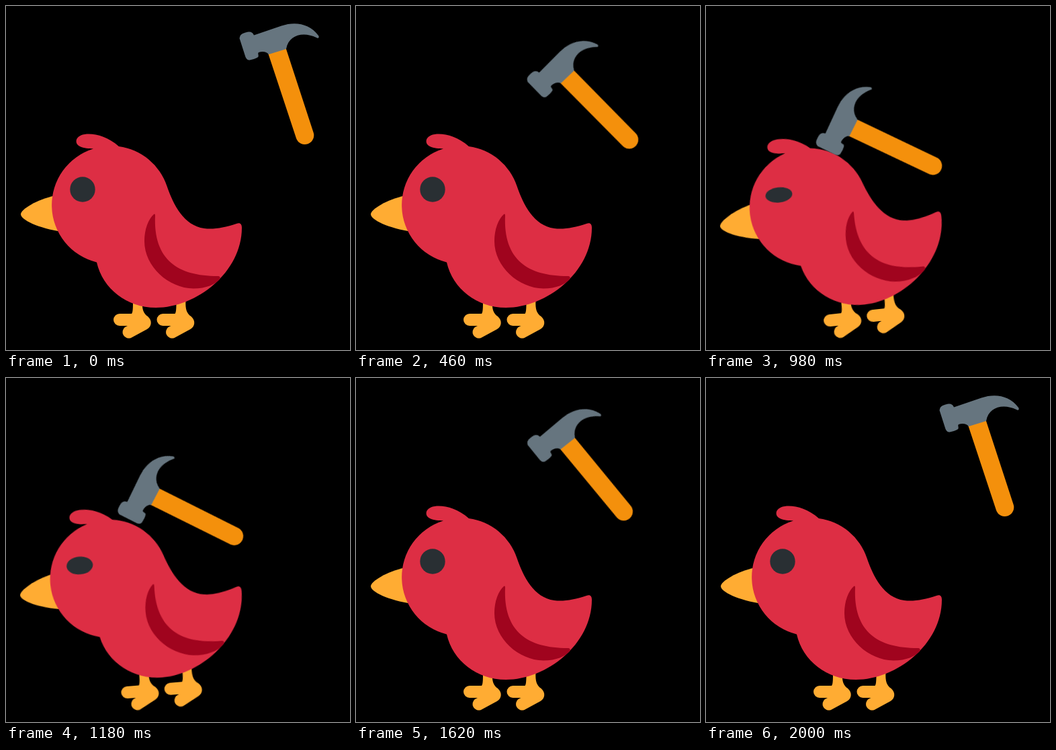
Write an HTML page without scripts that moves like this. It is 512 by 512 pixels and loops after 2080 ms.

```html
<!DOCTYPE html>
<html lang="en">
<head>
<meta charset="utf-8">
<title>Bird and hammer</title>
<style>
  html, body { margin: 0; width: 100%; height: 100%; overflow: hidden; background: #000; }
  svg { display: block; width: 100%; height: 100%; }

  .hammer, .bird, .eye { animation: 2080ms linear infinite; }
  .hammer { transform-origin: 413px 102px; animation-name: swing; }
  .bird { transform-origin: 186.5px 328px; animation-name: tilt; }
  .eye { transform-origin: 114px 273px; animation-name: squint; }

  /* each step lasts 20 ms */
  @keyframes swing {
    0% { transform: translate(0, 0) rotate(0deg); animation-timing-function: steps(12); }
    11.538% { transform: translate(-38px, 10px) rotate(-13.8deg); animation-timing-function: steps(11); }
    22.115% { transform: translate(-75px, 30px) rotate(-26.4deg); animation-timing-function: steps(4); }
    25.962% { transform: translate(-91px, 38.5px) rotate(-30.8deg); animation-timing-function: steps(11); }
    36.538% { transform: translate(-142px, 74px) rotate(-43.5deg); animation-timing-function: steps(4); }
    40.385% { transform: translate(-160px, 92px) rotate(-45.3deg); animation-timing-function: steps(8); }
    48.077% { transform: translate(-163px, 97px) rotate(-46.5deg); animation-timing-function: steps(9); }
    56.731% { transform: translate(-160px, 92.3px) rotate(-45.3deg); animation-timing-function: steps(13); }
    69.231% { transform: translate(-103.6px, 45px) rotate(-31.3deg); animation-timing-function: steps(9); }
    77.885% { transform: translate(-77px, 24px) rotate(-21.3deg); animation-timing-function: steps(8); }
    85.577% { transform: translate(-47.8px, 11.1px) rotate(-11.8deg); animation-timing-function: steps(11); }
    96.154%, 100% { transform: translate(0, 0) rotate(0deg); }
  }
  @keyframes tilt {
    0%, 39.423% { transform: rotate(0deg); animation-timing-function: steps(9); }
    48.077% { transform: rotate(-7deg); animation-timing-function: steps(9); }
    56.731% { transform: rotate(-4.7deg); animation-timing-function: steps(6); }
    62.5%, 100% { transform: rotate(0deg); }
  }
  @keyframes squint {
    0%, 39.423% { transform: scale(1, 1); animation-timing-function: steps(9); }
    48.077% { transform: scale(1.08, .56); animation-timing-function: steps(9); }
    56.731% { transform: scale(1.05, .71); animation-timing-function: steps(6); }
    62.5%, 100% { transform: scale(1, 1); }
  }
</style>
</head>
<body>
<svg viewBox="0 0 512 512">
  <defs>
    <path id="leg" d="M189 438H203C202 452 205 458 211 462C218 468 217 477 210 481L186 494A9.300 9.300 0 0 1 177 478L181 476H169A9 9 0 0 1 169 458H187C189 456 189 448 189 438Z"/>
  </defs>

  <g class="bird">
    <g fill="#ffac33">
      <use href="#leg"/>
      <use href="#leg" x="64.5"/>
      <path d="M74 282C45 288 22 303 22 310C22 318 48 331 84 336Z"/>
    </g>
    <path fill="#dd2e44" d="M168 209C150 193 130 189 117 191C103 193 101 205 110 209C116 212 123 212 130 212.500A87.700 87.700 0 0 0 135 381.500C144 421 180 449 223 449C284 449 351 396 351 330C351 324 348 322 343 324C325 330 308 333 295 331C265 327 249 296 239.500 268A87.700 87.700 0 0 0 168 209Z"/>
    <path fill="#a0041e" d="M220 310C212 317 206 332 206 350C206 388 242 420 279 420.500C298 420.500 312 414 318 407C320 404 318 402 315 402C256 402 219 378 222 312C222 309 221 309 220 310Z"/>
    <circle class="eye" cx="114" cy="273" r="18.700" fill="#292f33"/>
  </g>

  <g class="hammer">
    <path fill="#f4900c" d="M390 70L416 61L457.500 188A13.300 13.300 0 0 1 432 197Z"/>
    <path fill="#66757f" d="M348.500 44.500C350 41 358 38.500 362 38.500C366 38.500 368 41 369 43.500L410 29.500C430 22.500 452 26 465 44C467 47 464 49 462 47C443 38 421 42 417 64L391 72C388 68 382 67 376 69C374 71 377 74 375 76C373 78 365 80.500 361.500 80.500C359 80.500 357.500 78 356.500 76L347.500 48Z"/>
  </g>
</svg>
</body>
</html>
```
